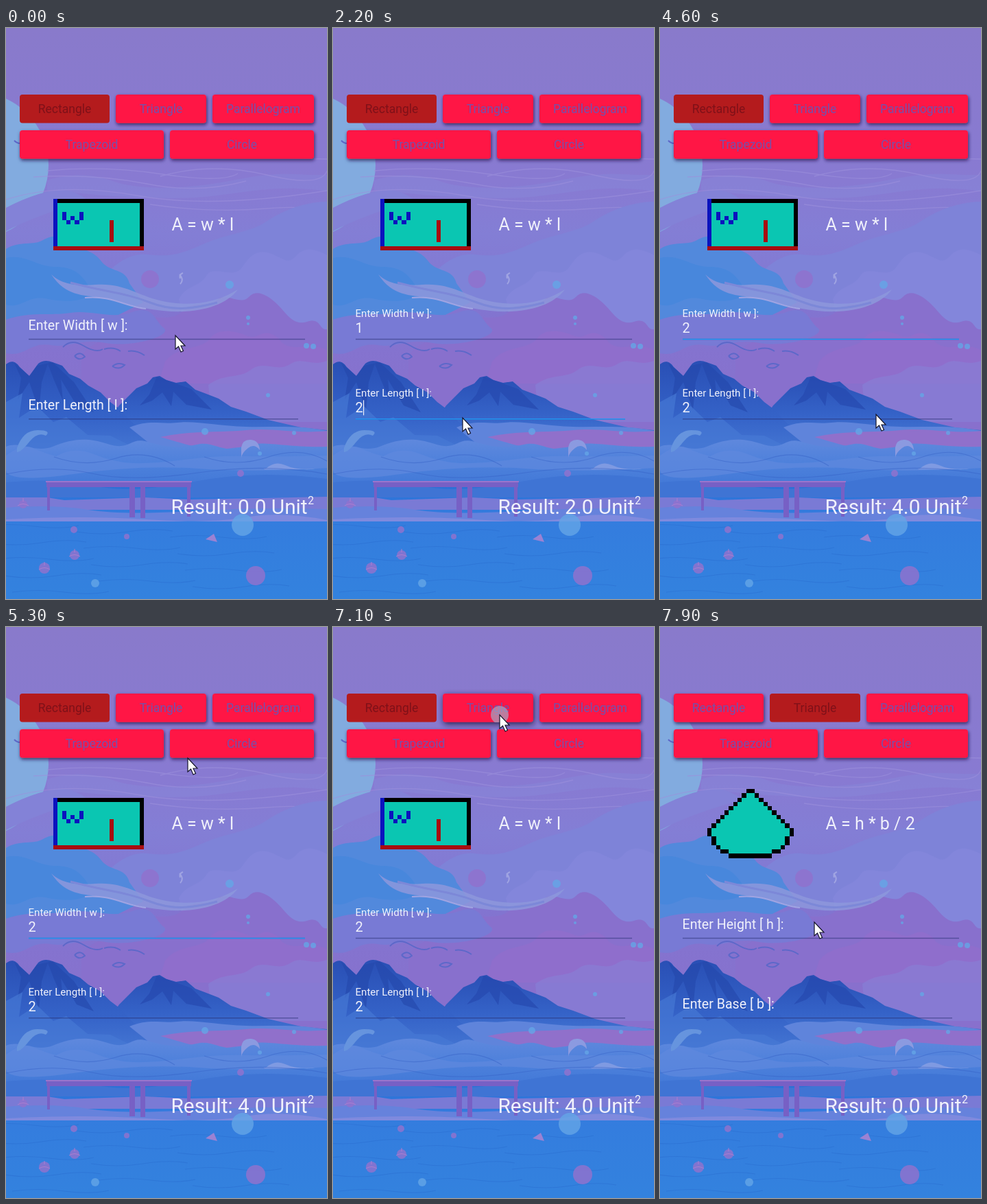
Recreate the animation shown at these times as an HTML page. Size 468x832 px, loop 8000 ms.

```html
<!DOCTYPE html>
<html lang="en">
<head>
<meta charset="utf-8">
<title>Area calculator</title>
<style>
html, body { margin: 0; width: 100%; height: 100%; overflow: hidden; background: #8c7acb; }
svg { display: block; width: 100vw; height: 100vh; font-family: Roboto, "Open Sans", sans-serif; }
.ink { fill: #f0f1fb; }
</style>
</head>
<body>
<svg viewBox="0 0 468 832" xmlns="http://www.w3.org/2000/svg">
<defs>
  <linearGradient id="sky" x2="0" y2="1">
    <stop offset="0" stop-color="#897acb"/><stop offset=".27" stop-color="#887ad2"/>
    <stop offset=".36" stop-color="#837ed5"/><stop offset=".5" stop-color="#8274d0"/>
    <stop offset=".72" stop-color="#8a70cc"/>
  </linearGradient>
  <linearGradient id="peak" x2="0" y2="1">
    <stop offset="0" stop-color="#294fb5"/><stop offset=".5" stop-color="#3563c8"/><stop offset="1" stop-color="#4f83da"/>
  </linearGradient>
  <linearGradient id="haze" x2="0" y2="1">
    <stop offset="0" stop-color="#5f88dd"/><stop offset=".5" stop-color="#4c80db"/><stop offset="1" stop-color="#3f76d6"/>
  </linearGradient>
  <linearGradient id="sea" x2="0" y2="1">
    <stop offset="0" stop-color="#2a70d6"/><stop offset=".25" stop-color="#347cde"/><stop offset="1" stop-color="#3382de"/>
  </linearGradient>
  <filter id="shade" x="-10%" y="-30%" width="120%" height="170%">
    <feDropShadow dx="1" dy="2.5" stdDeviation="2.8" flood-color="#1c1440" flood-opacity=".75"/>
  </filter>
  <filter id="raised" x="-10%" y="-40%" width="120%" height="190%">
    <feDropShadow dx="1" dy="3" stdDeviation="4.5" flood-color="#1c1440" flood-opacity=".9"/>
  </filter>
  <clipPath id="pressArea"><rect x="160" y="97" width="132" height="42" rx="4"/></clipPath>
</defs>

<!-- sky and clouds -->
<rect width="468" height="832" fill="url(#sky)"/>
<path d="M60 222C100 210 130 214 158 224S250 238 330 222 420 216 468 214V238C400 228 360 238 300 245S150 246 60 236Z" fill="#8883d7" opacity=".7"/>
<circle cx="-45" cy="200" r="107" fill="#82abdf"/>
<path d="M0 262Q30 246 62 238T120 252Q50 270 0 296Z" fill="#8382d7"/>
<g fill="none" stroke="#9c90dc" stroke-width="1.3" opacity=".6">
  <path d="M60 208Q140 200 228 213T338 212"/><path d="M40 217Q130 212 205 227T350 223"/>
  <path d="M225 216Q300 195 380 214T468 208"/><path d="M0 250Q80 224 190 244T468 237"/>
  <path d="M210 257Q300 270 380 263T468 278"/><path d="M320 180Q380 190 468 191"/>
</g>
<path d="M468 253C430 254 400 268 378 283S320 300 285 316 235 333 205 330 150 352 130 375L250 410 468 402Z" fill="#7e83d8"/>
<path d="M0 322C18 310 42 317 54 309S88 300 103 314 126 323 139 340 174 349 180 372L200 400 150 425 60 440 0 444Z" fill="#5289dc"/>
<path d="M0 335C28 329 46 348 70 348S107 354 120 375 95 402 62 395 25 410 0 403Z" fill="#4587dc" opacity=".75"/>
<path d="M252 395C263 374 282 378 292 361S332 367 344 349 367 321 387 329 411 345 423 332 449 321 468 331V440L260 430Z" fill="#8386db"/>
<path d="M110 480C120 456 150 456 164 444S191 430 208 424 242 428 258 412 295 408 308 396 342 405 354 392 383 391 395 402 418 435 439 428 456 441 468 439V600H110Z" fill="#8870cd"/>
<path d="M232 486C250 462 286 469 297 453S333 441 350 448 371 440 387 446 397 460 414 464 441 457 468 469V518H222Z" fill="#8f6ecc"/>
<path d="M0 425C38 412 64 420 94 415S153 425 184 414 216 426 230 437 186 466 145 459 95 467 65 462 28 480 0 474Z" fill="#787ad5"/>
<path d="M295 520C320 502 339 512 357 498S396 502 414 490 444 494 468 485V574H300Z" fill="#8780d8" opacity=".6"/>
<path d="M66 359C84 377 113 375 130 374 171 371 191 389 224 397S300 405 338 381C320 406 276 417 229 412S166 397 139 393 87 391 66 359Z" fill="#8e98dc" opacity=".85"/>
<path d="M94 371C146 385 175 386 210 400S278 408 308 400" fill="none" stroke="#7c88d8" stroke-width="3"/>
<path d="M115 393C153 389 174 406 204 409M253 359q7 8 1 14m4-16q-6 2-4 8" fill="none" stroke="#a0a4e2" stroke-width="2"/>
<g fill="none" stroke="#5d68c9" stroke-width="2">
  <path d="M83 465q12-13 30-2t28 5M100 478q8-8 15 1-8 7-15-1"/>
  <path d="M143 468q14-4 24 3m-12 22q8-7 18-2-8 8-18 2m23-22q12-2 24 6M12 164q4 4 8 4"/>
</g>

<!-- mountains and hills -->
<path d="M148 575 165 550 178 537 190 525 206 518 214 509 224 507 234 513 248 517 262 515 276 527 292 533 310 540 328 552 350 559 382 571 430 582 468 586V620H148Z" fill="url(#peak)"/>
<path d="M0 490C7 484 14 485 20 494L34 507 47 489Q56 482 68 487L82 492 92 504 108 511 120 521 138 531 152 545 168 557 182 573 205 592 240 615 190 650H0Z" fill="url(#peak)"/>
<path d="M12 488 22 510 17 542 34 516 48 557 52 516 61 489 70 513 83 543 80 512 103 550 128 560 99 516 68 487 45 492 34 507Z" fill="#2448ab" opacity=".62"/>
<path d="M220 508 209 534 195 550 213 543 228 531 241 551 244 530 263 549 300 556 270 526 234 513Z" fill="#2549b0" opacity=".7"/>
<path d="M0 545 24 532 19 568 45 551 69 574 88 567 119 593 152 594 188 612 152 650 0 652Z" fill="#477ad6" opacity=".65"/>
<path d="M180 582C210 570 224 578 250 575S309 580 350 581 424 578 468 587V622H230Z" fill="#5f84db"/>
<path d="M225 596C270 586 308 590 350 586S422 592 468 587V611C407 617 370 606 330 612S263 606 225 596Z" fill="#9070cb"/>
<path d="M0 610C22 601 42 620 68 610S114 595 148 606 180 595 207 603 252 613 278 607 315 621 344 610 405 612 468 610V676H0Z" fill="url(#haze)"/>
<path d="M0 623Q24 605 39 612T73 624Q99 609 128 621T185 634T260 629T350 624T468 623V641Q363 648 280 642T98 650T0 643Z" fill="#6089de" opacity=".7"/>
<path d="M16 612Q25 586 46 586T58 594Q46 588 34 603T16 618Z" fill="#6694de"/>
<path d="M343 611q2-12 14-11t13 15q-8-10-17-3t-10 14" fill="#8b9ae0"/>
<path d="M379 642q13-12 28-5t37 6-29 0-36-1" fill="#7f9ae2"/>
<g fill="none" stroke="#345fc4" stroke-width="1.2" opacity=".45">
  <path d="M70 625Q115 641 160 627T246 638"/><path d="M289 625Q336 641 383 625T468 631"/>
  <path d="M0 650Q68 636 125 649T280 648T468 650"/>
</g>

<!-- water and pier -->
<rect y="668" width="468" height="164" fill="url(#sea)"/>
<path d="M0 662Q75 655 128 667T274 661T468 657V684H0Z" fill="#3f74d4"/>
<path d="M0 684H60L85 688 202 684 270 687 468 683V702H0Z" fill="#7a7ad5"/>
<path d="M0 699Q70 694 120 702T270 704T468 701V718H0Z" fill="#6682dc"/>
<path d="M0 716Q110 710 205 716T350 713T468 717V719H0Z" fill="#7f8ade"/>
<g fill="#7760c5">
  <rect x="59" y="661" width="211" height="8"/><rect x="60" y="669" width="4" height="34"/>
  <rect x="180" y="669" width="8" height="44"/><rect x="196" y="669" width="7" height="45"/><rect x="264" y="669" width="5" height="43"/>
</g>
<path d="M58 661H271" stroke="#9a75cc" stroke-width="2"/>
<g id="waves" fill="none" stroke="#2a6dcf" stroke-width="1.2" opacity=".5"></g>
<g id="motes"></g>

<!-- interface -->
<g id="buttons" font-size="17.5" text-anchor="middle"></g>
<circle id="ripple" cx="243" cy="128" fill="#a2a7c5" clip-path="url(#pressArea)"/>
<g id="rectIcon" shape-rendering="crispEdges"></g>
<g id="triIcon" shape-rendering="crispEdges"></g>
<text id="formula" class="ink" x="241.5" y="295" font-size="25"></text>
<g id="fields" class="ink"></g>
<text id="result" class="ink" x="240.5" y="707.5" font-size="29.8"></text>
<text class="ink" x="440" y="694" font-size="16">2</text>
<path id="cursor" d="M0 0V20L4.5 16 8 24 11.5 22.5 8 15H14Z" fill="#fff" stroke="#15152a" stroke-width="1.2"/>
</svg>
<script>
const NS = 'http://www.w3.org/2000/svg';
const LOOP = 8000;
const FOCUS_MS = 200;
const $ = id => document.getElementById(id);
const clamp = v => Math.max(0, Math.min(1, v));
const mix = (a, b, p) => a + (b - a) * p;

function set(node, attrs) {
  for (const key in attrs) node.setAttribute(key, attrs[key]);
  return node;
}
function add(parent, tag, attrs) {
  return parent.appendChild(set(document.createElementNS(NS, tag), attrs));
}

// Scenery details
for (let i = 0; i < 13; i++) {
  const x = (i * 137) % 400, y = 726 + i * 8;
  add($('waves'), 'path', { d: `M${x - 35} ${y}q38 ${i % 2 ? 6 : -5} 76 0t65 -1` });
}
function motes(fill, opacity, spots) {
  for (const [cx, cy, r] of spots) add($('motes'), 'circle', { cx, cy, r, fill, opacity });
}
motes('#8f72ce', .85, [[210, 366, 13], [364, 798, 14], [56, 787, 8], [100, 768, 7], [25, 694, 6], [176, 741, 4], [99, 731, 5], [342, 649, 5]]);
motes('#64a5e6', .8, [[345, 724, 16], [326, 374, 6], [290, 588, 5], [130, 809, 6], [353, 422, 3], [438, 463, 4], [448, 464, 4], [382, 535, 3], [370, 620, 3], [353, 431, 2], [420, 590, 3]]);
add($('motes'), 'path', { d: 'M291 745L303 737 308 749Z', fill: '#9b82d3' });
for (const [x, y] of [[56, 787], [100, 768], [25, 694]])
  add($('motes'), 'path', { d: `M${x - 8} ${y + 2}q8 -5 16 0M${x} ${y - 9}v5`, fill: 'none', stroke: '#ab7fcf' });

// Shape buttons
const buttons = [
  ['Rectangle', 20, 97, 131], ['Triangle', 160, 97, 132], ['Parallelogram', 301, 97, 148],
  ['Trapezoid', 20, 149, 210], ['Circle', 239, 149, 210]
].map(([name, x, y, width]) => {
  const box = add($('buttons'), 'rect', { x, y, width, height: 41.5, rx: 4 });
  const label = add($('buttons'), 'text', { x: x + width / 2, y: y + 26.7 });
  label.textContent = name;
  return { box, label };
});

// Pixel icons
function pixels(parent, left, top, size, fill, cells) {
  for (const [col, row, w = 1, h = 1] of cells)
    add(parent, 'rect', { x: left + col * size, y: top + row * size, width: w * size, height: h * size, fill });
}
const rectPart = (fill, cells) => pixels($('rectIcon'), 69, 248.7, 6.28, fill, cells);
rectPart('#0ac6b2', [[0, 0, 21, 12]]);
rectPart('#000', [[1, 0, 20, 1], [20, 0, 1, 11]]);
rectPart('#0b12be', [[0, 0, 1, 11], [2, 3, 1, 2], [3, 5], [4, 4], [5, 5], [6, 3, 1, 2]]);
rectPart('#a80d10', [[0, 11, 21, 1], [13, 5, 1, 5]]);

const triPart = (fill, cells) => pixels($('triIcon'), 69, 236, 6.29, fill, cells);
for (let row = 0; row < 16; row++) {
  const inset = row < 10 ? 9 - row : [0, 1, 1, 2, 3, 5][row - 10];
  const edge = row === 14 ? 2 : row === 15 ? 5 : 1;
  triPart('#000', [[inset, row, 20 - inset * 2, 1]]);
  if (inset + edge < 10) triPart('#0ac6b2', [[inset + edge, row, 20 - 2 * (inset + edge), 1]]);
}

// Text fields
function makeField(top, right) {
  const g = $('fields');
  return {
    top, right,
    label: add(g, 'text', { x: 32.5 }),
    value: add(g, 'text', { x: 32.5, y: top + 28, 'font-size': 20 }),
    caret: add(g, 'rect', { x: 44, y: top + 10, width: 1.2, height: 22 }),
    base: add(g, 'path', { d: `M33 ${top + 37.5}H${right}`, stroke: '#262c70', 'stroke-opacity': .5, 'stroke-width': 1.6 }),
    line: add(g, 'path', { stroke: '#2196f3', 'stroke-width': 1.5 })
  };
}
const first = makeField(416, 436);
const second = makeField(532.3, 426);

function drawField(field, name, value, lift, focus, caret) {
  const half = (field.right - 33) / 2 * focus, mid = (field.right + 33) / 2, y = field.top + 37.5;
  field.label.textContent = name;
  set(field.label, { y: field.top + mix(24, 5, lift), 'font-size': mix(19.6, 15.1, lift) });
  field.value.textContent = value;
  set(field.caret, { x: value ? 44 : 33, visibility: caret ? 'visible' : 'hidden' });
  set(field.line, { d: `M${mid - half} ${y}H${mid + half}`, visibility: focus > 0 ? 'visible' : 'hidden' });
}

// [time, x, y] of the pointer tip
const pointer = [
  [0, 247, 448], [900, 245, 449], [1100, 189, 568], [2600, 189, 568],
  [3000, 148, 441], [4300, 148, 441], [4600, 315, 563], [5100, 282, 270], [5500, 248, 112],
  [6000, 235, 139], [6300, 235, 139], [6700, 243, 128], [7350, 243, 128], [7900, 225, 430]
];
function pointerAt(t) {
  const i = pointer.findIndex(k => k[0] > t);
  if (i < 0) return pointer[pointer.length - 1].slice(1);
  const [t0, x0, y0] = pointer[i - 1], [t1, x1, y1] = pointer[i];
  const p = (t - t0) / (t1 - t0), ease = p * p * (3 - 2 * p);
  return [mix(x0, x1, ease), mix(y0, y1, ease)];
}

const within = (t, ...spans) => spans.some(([a, b]) => t >= a && t < b);

function render(t) {
  const ramp = start => clamp((t - start) / FOCUS_MS);
  const triangle = t >= 7400;
  const selected = triangle ? 1 : 0;
  buttons.forEach(({ box, label }, i) => {
    const active = i === selected, pressed = i === 1 && within(t, [7000, 7400]);
    set(box, { fill: active ? '#b41b1d' : '#ff1744', filter: active ? 'none' : pressed ? 'url(#raised)' : 'url(#shade)' });
    set(label, { fill: active ? '#7f1119' : '#7650aa' });
  });
  set($('ripple'), { r: Math.max(0, (t - 7000) * .13), opacity: within(t, [7000, 7400]) ? .7 * clamp((7400 - t) / 200) : 0 });
  set($('rectIcon'), { visibility: triangle ? 'hidden' : 'visible' });
  set($('triIcon'), { visibility: triangle ? 'visible' : 'hidden' });
  $('formula').textContent = triangle ? 'A = h * b / 2' : 'A = w * l';

  const w = triangle || t < 900 ? '' : t < 3800 ? '1' : t < 3900 ? '' : '2';
  const l = triangle || t < 2200 ? '' : '2';
  const focusW = ramp(300) - ramp(1700) + ramp(3070) - ramp(6880);
  const focusL = ramp(1700) - ramp(3070);
  drawField(first, triangle ? 'Enter Height [ h ]:' : 'Enter Width [ w ]:', w, triangle ? 0 : ramp(300), focusW,
    within(t, [400, 900], [1400, 1700], [3100, 3600], [3800, 4300], [4800, 5300], [5800, 6300], [6800, 7000]));
  drawField(second, triangle ? 'Enter Base [ b ]:' : 'Enter Length [ l ]:', l, triangle ? 0 : ramp(1700), focusL,
    within(t, [1800, 2700]));
  $('result').textContent = `Result: ${(w * l).toFixed(1)} Unit`;
  set($('cursor'), { transform: `translate(${pointerAt(t)})` });
}

const start = performance.now();
function tick() {
  const t = (performance.now() - start) % LOOP;
  render(Math.floor(t / 100) * 100);
  requestAnimationFrame(tick);
}
tick();
</script>
</body>
</html>
```
